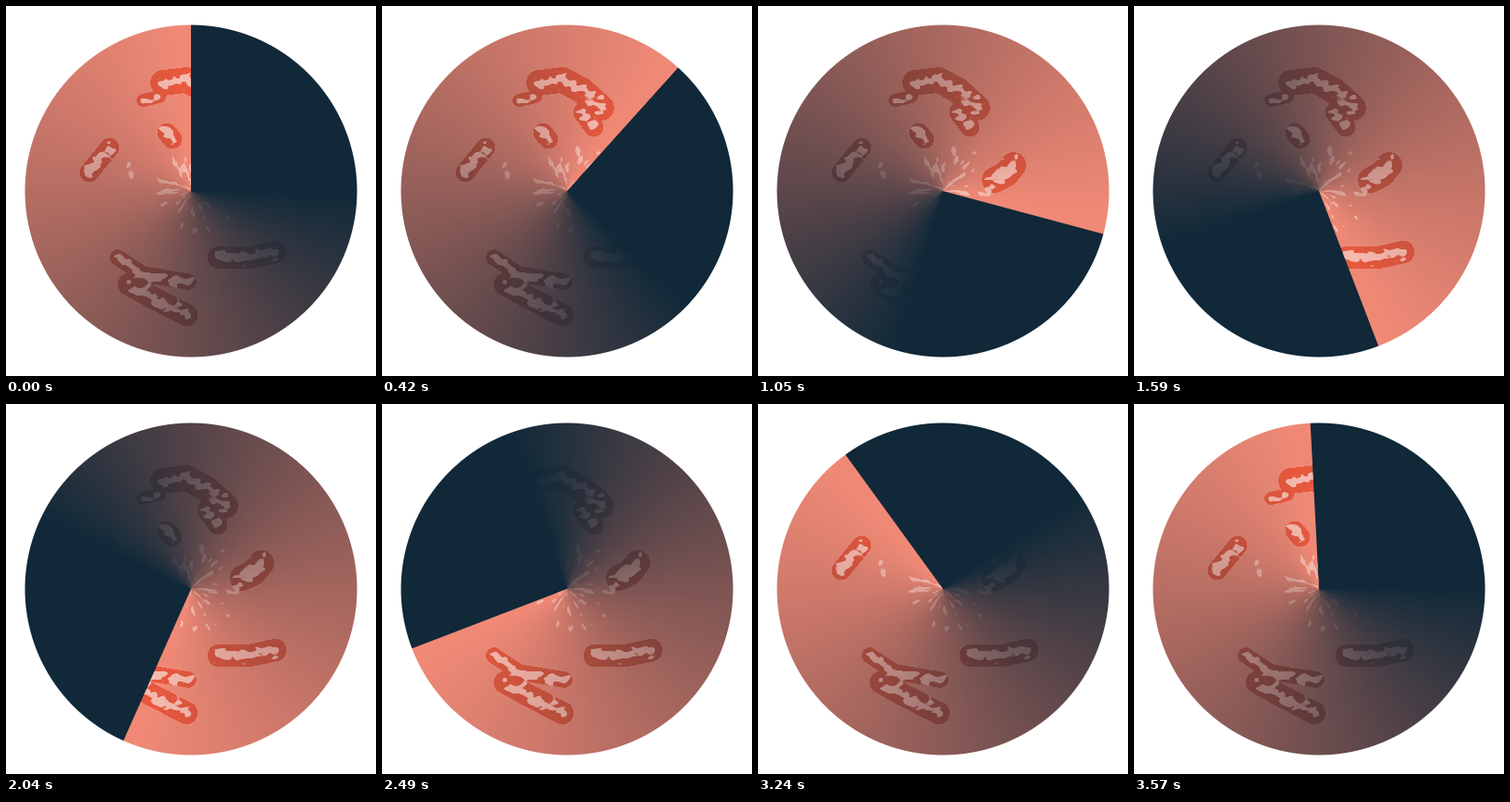
These frames come from a looping animation (400x400 px, 3.6 s). A matplotlib script:

```python
import numpy as np
import matplotlib.pyplot as plt
from matplotlib.animation import FuncAnimation

SIZE, FRAMES, INTERVAL = 400, 120, 30
CENTER, RADIUS = 200, 180
TAIL = 270          # degrees over which the sweep fades out
PEAK = 0.975        # strength right behind the sweep line
ECHO_ALPHA = 0.6

NAVY = np.array([16, 41, 57]) / 255
ORANGE = np.array([238, 90, 62]) / 255
WHITE = np.ones(3)

# rain bands: half width, then key points of the centre line
BANDS = [
    (8, [(170, 83), (195, 80), (216, 91), (237, 110)]),
    (6, [(217, 115), (229, 131)]),
    (6, [(174, 137), (180, 144)]),
    (4, [(148, 102), (166, 98)]),
    (6, [(90, 180), (103, 164), (112, 153)]),
    (8, [(256, 188), (268, 182), (276, 172)]),
    (7, [(230, 272), (264, 272), (291, 266)]),
    (5, [(121, 272), (148, 290), (197, 298)]),
    (7, [(133, 301), (158, 315), (195, 334)]),
]

rng = np.random.default_rng(7)
yy, xx = np.mgrid[0:SIZE, 0:SIZE] + 0.5
dx, dy = xx - CENTER, yy - CENTER
dist = np.hypot(dx, dy)
bearing = np.degrees(np.arctan2(dx, -dy)) % 360


def smooth_noise(rows, cols, sy, sx):
    """Blurred white noise, wrapped at the borders, with unit deviation."""
    fy = np.fft.fftfreq(rows)[:, None] * sy
    fx = np.fft.fftfreq(cols)[None, :] * sx
    blur = np.exp(-2 * np.pi ** 2 * (fx ** 2 + fy ** 2))
    noise = np.fft.ifft2(np.fft.fft2(rng.normal(size=(rows, cols))) * blur).real
    return noise / noise.std()


def segment_distance(a, b):
    (ax, ay), (bx, by) = a, b
    ux, uy = bx - ax, by - ay
    t = np.clip(((xx - ax) * ux + (yy - ay) * uy) / (ux ** 2 + uy ** 2), 0, 1)
    return np.hypot(xx - ax - t * ux, yy - ay - t * uy)


def rain():
    """Ragged patches: noise lifted over a threshold near the bands."""
    lift = np.zeros((SIZE, SIZE))
    for width, points in BANDS:
        d = np.min([segment_distance(a, b)
                    for a, b in zip(points, points[1:])], axis=0)
        lift = np.maximum(lift, np.exp(-(d / width) ** 2))
    noise = smooth_noise(SIZE, SIZE, 1.6, 2.6)
    return (0.7 * noise + 2.6 * lift - 1.7) * (lift > 0.05)


def clutter():
    """Radial streaks thinning out away from the centre."""
    noise = smooth_noise(360, SIZE, 2.5, 3.5)
    streaks = noise[bearing.astype(int) % 360, dist.astype(int) % SIZE]
    return np.where(dist < 75, streaks - 0.4 - dist / 38, -1)


def mix(under, color, alpha):
    return under + (color - under) * alpha[..., None]


def sweep_fade(angle):
    behind = (angle - bearing) % 360
    fade = np.clip(1 - behind / TAIL, 0, PEAK)
    # soften the leading edge by one pixel
    signed = (behind + 180) % 360 - 180
    edge = np.clip(0.5 + dist * np.radians(signed), 0, 1)
    near = np.abs(signed) < 90
    return np.where(near, np.where(signed < 0, PEAK, fade) * edge, fade)


disc = np.clip(RADIUS - dist, 0, 1)
rain_mask = np.clip(rain() * 3 + 0.5, 0, 1)
clutter_mask = np.clip(clutter() * 2 + 0.5, 0, 1)
echoes = np.maximum(rain_mask, clutter_mask) * ECHO_ALPHA
page = np.ones((SIZE, SIZE, 3))


def render(i):
    fade = sweep_fade(i * 360 / FRAMES)
    face = mix(np.ones_like(page) * NAVY, ORANGE, fade)
    face = mix(face, WHITE, echoes * fade)
    return mix(page, face, disc)


fig = plt.figure(figsize=(4, 4), dpi=100, facecolor="white")
ax = fig.add_axes([0, 0, 1, 1])
ax.axis("off")
image = ax.imshow(render(0), extent=(0, SIZE, SIZE, 0), interpolation="nearest")


def update(i):
    image.set_data(render(i))
    return [image]


anim = FuncAnimation(fig, update, frames=FRAMES, interval=INTERVAL,
                     repeat=True, repeat_delay=0, blit=False)
plt.show()
```
